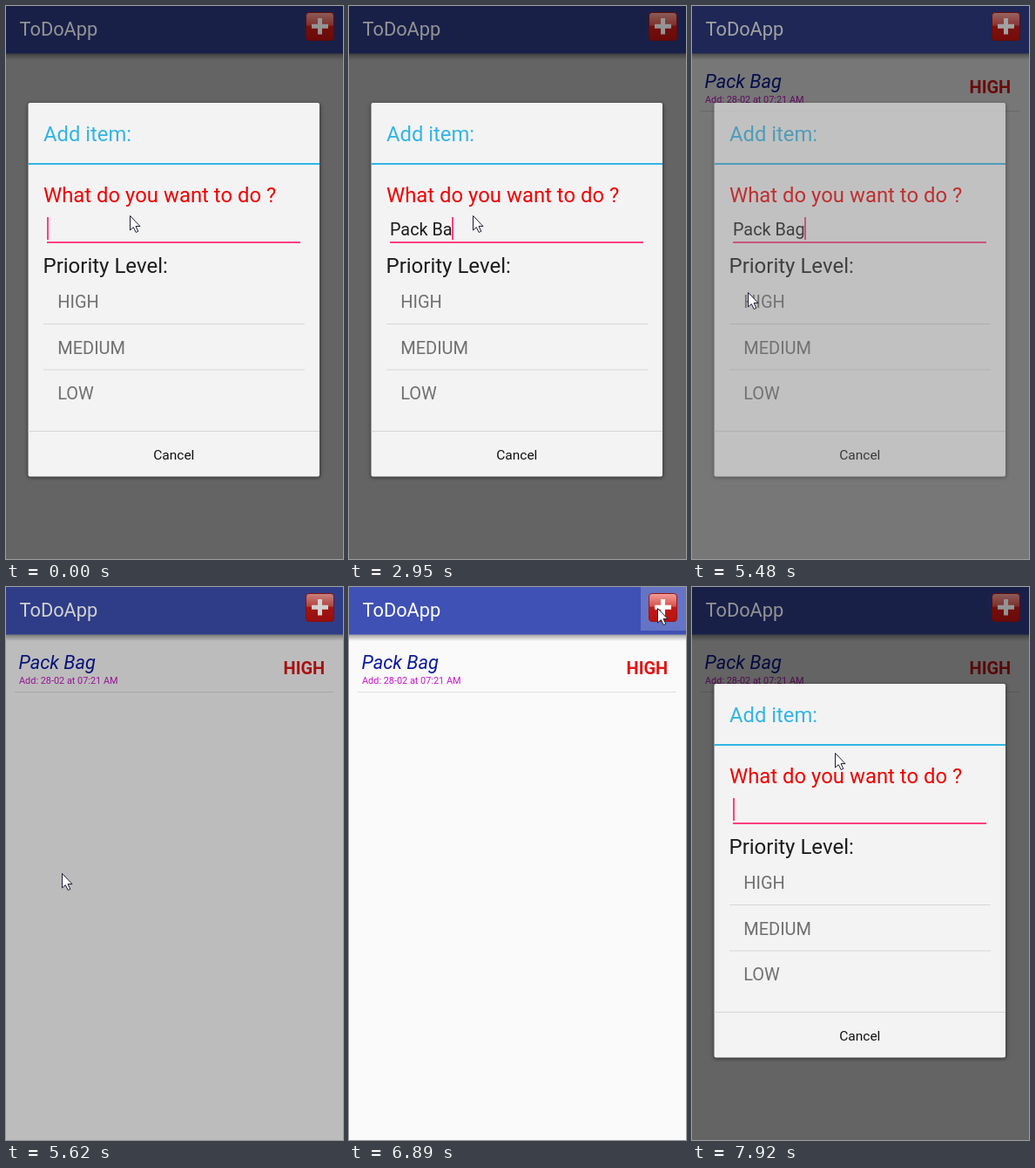
An HTML page for the animation above (8 s loop, 387 px wide and 634 px high).

```html
<!DOCTYPE html>
<html lang="en">
<head>
<meta charset="utf-8">
<title>To-do list</title>
<style>
html, body { margin: 0; width: 100%; height: 100%; overflow: hidden; background: #fafafa; }
svg { display: block; width: 387px; height: 634px; font-family: Roboto, sans-serif; }
text { white-space: pre; }
</style>
</head>
<body>
<svg viewBox="0 0 387 634">
  <defs>
    <linearGradient id="shade" x2="0" y2="1">
      <stop stop-color="#000" stop-opacity=".38"/>
      <stop offset="1" stop-color="#000" stop-opacity="0"/>
    </linearGradient>
    <linearGradient id="red" x2="0" y2="1">
      <stop stop-color="#f0a09a"/>
      <stop offset=".45" stop-color="#d9534c"/>
      <stop offset=".5" stop-color="#c41a16"/>
      <stop offset="1" stop-color="#b81210"/>
    </linearGradient>
    <filter id="soft"><feGaussianBlur stdDeviation="2"/></filter>
  </defs>

  <rect width="387" height="634" fill="#fafafa"/>
  <rect y="54" width="387" height="8" fill="url(#shade)"/>
  <rect width="387" height="54.5" fill="#3f51b5"/>
  <rect id="press" x="335" width="52" height="50" fill="#fff" opacity=".2"/>
  <g id="item">
    <text x="14.5" y="94" font-size="21.8" font-style="italic" fill="#0a1a9c">Pack Bag</text>
    <text x="15" y="111" font-size="10.9" fill="#c715c7">Add: 28-02 at 07:21 AM</text>
    <text x="318.5" y="100" font-size="20" font-weight="700" fill="#e01515">HIGH</text>
    <rect x="10" y="120" width="366" height="1" fill="#dcdcdc"/>
  </g>
  <rect id="dim" width="387" height="634"/>

  <g id="bar">
    <text x="15.5" y="33.5" font-size="21.8" fill="#fff">ToDoApp</text>
    <rect x="344.5" y="7.5" width="32" height="32" rx="3.5" fill="url(#red)" stroke="#9c1512"/>
    <path d="M360.5 14v18.5M351 23.2h19" stroke="#fff" stroke-width="5"/>
  </g>

  <g id="dialog">
    <rect x="25" y="112" width="336" height="429" rx="2" opacity=".45" filter="url(#soft)"/>
    <rect x="25.5" y="111" width="334.5" height="428.5" rx="2" fill="#f3f3f3"/>
    <text x="43" y="155" font-size="23.8" fill="#33b5e5">Add item:</text>
    <rect x="25.5" y="180" width="334.5" height="2" fill="#33b5e5"/>
    <text x="43" y="225" font-size="23.9" fill="#f00000">What do you want to do ?</text>
    <text id="input" x="47" y="263" font-size="19.8" fill="#1c1c1c"></text>
    <rect id="caret" y="242" width="2" height="26" fill="#ff4081"/>
    <rect x="47" y="270" width="291" height="2" fill="#ff4081"/>
    <text x="42.5" y="306" font-size="24" fill="#1c1c1c">Priority Level:</text>
    <g font-size="20" fill="#707070">
      <text x="59.2" y="346">HIGH</text>
      <text x="59.2" y="398.5">MEDIUM</text>
      <text x="59.2" y="451">LOW</text>
    </g>
    <path d="M43 364.5h300M43 417h300M25.5 487.5h334.5" stroke="#d6d6d6"/>
    <text x="192.8" y="519.5" font-size="15.5" text-anchor="middle" fill="#111">Cancel</text>
  </g>

  <path id="mouse" d="M.5 .5V17l3.8-3.4 2.9 5.9 2.6-1.2-2.8-5.7h5z" fill="#fff" stroke="#1b1b38"/>
</svg>
<script>
const LOOP = 8000;
const el = id => document.getElementById(id);

const ticks = [4240, 4390, 4530, 4670, 4810, 4950, 5090, 5230, 5360, 5490, 5620, 5740, 5880, 6020,
  6170, 6320, 6460, 6610, 6750, 6890, 7020, 7140, 7280, 7430, 7550, 7740, 7920];
const keyTimes = [290, 850, 1120, 1410, 1710, 2270, 2950, 3230];
const caretX = [47, 59, 70, 80, 90, 95, 107, 118, 129];
const caretOff = [[3790, 4240], [4810, 5230], [7550, 7920]];

// Rows: time, x, y
const mousePath = [[4240, 142, 240], [4810, 50, 332], [4950, 31, 351], [5230, 64, 328],
  [6020, 64, 328], [6320, 155, 180], [6460, 180, 130], [6750, 354, 24],
  [7140, 354, 24], [7430, 204, 157], [7740, 172, 184], [7920, 164, 190]];
// Rows: time, opacity
const dimPath = [[5230, .6], [5360, .52], [5620, .25], [5880, 0], [6890, 0], [7020, .25], [7140, .5], [7280, .6]];
const dialogPath = [[5230, 1], [5360, .6], [5490, 0], [6890, 0], [7020, .6], [7140, 1]];

function sample(path, t) {
  const i = path.findIndex(row => row[0] > t);
  if (i < 0) return path[path.length - 1].slice(1);
  if (i === 0) return path[0].slice(1);
  const a = path[i - 1], b = path[i], k = (t - a[0]) / (b[0] - a[0]);
  return a.slice(1).map((v, j) => v + (b[j + 1] - v) * k);
}

function draw(now) {
  const time = now % LOOP;
  const t = ticks.filter(tick => tick <= time).pop() ?? time;
  const typed = t < 6000 ? keyTimes.filter(k => k <= t).length : 0;
  const [dim] = sample(dimPath, t);
  const [shown] = sample(dialogPath, t);
  const [x, y] = sample(mousePath, t);

  el('input').textContent = 'Pack Bag'.slice(0, typed);
  el('caret').setAttribute('x', caretX[typed]);
  el('caret').style.opacity = caretOff.some(([a, b]) => t >= a && t < b) ? 0 : 1;
  el('item').style.opacity = t >= 5360 ? 1 : 0;
  el('press').style.opacity = t >= 6750 && t < 7020 ? .2 : 0;
  el('dim').style.opacity = dim;
  el('bar').style.filter = `brightness(${1 - dim * .7})`;
  el('dialog').style.opacity = shown;
  el('mouse').setAttribute('transform', `translate(${x} ${y})`);
  requestAnimationFrame(draw);
}
requestAnimationFrame(draw);
</script>
</body>
</html>
```
